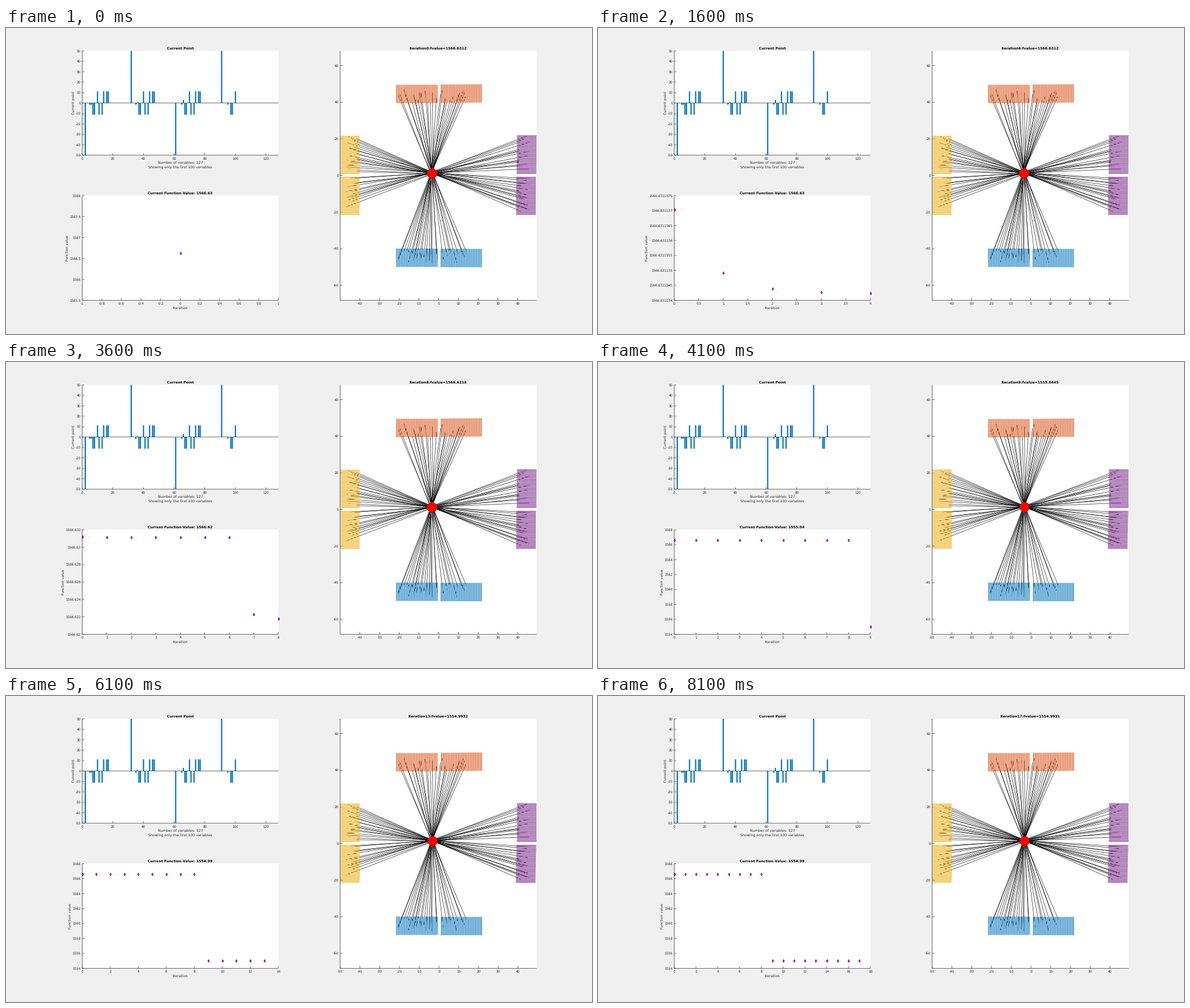
Animation, 1034 px wide and 541 px high, one loop 9100 ms. Source, as a matplotlib script:

```python
import numpy as np
import matplotlib.pyplot as plt
from matplotlib.animation import FuncAnimation
from matplotlib.collections import LineCollection
from matplotlib.patches import Rectangle

W, H = 1034, 541
PX = 0.72  # points per pixel at 100 dpi
INK = "#262626"
BLUE, ORANGE, YELLOW, PURPLE = "#0072BD", "#D95319", "#EDB120", "#7E2F8E"
TICK_SIZE, LABEL_SIZE = 5.68, 6.25
LAST, DROP = 17, 9  # last iteration, and the one with the large drop

plt.rcParams.update({"font.family": "DejaVu Sans", "text.hinting": "none",
                     "path.snap": False, "toolbar": "None"})
fig = plt.figure(figsize=(W / 100, H / 100), dpi=100, facecolor="#f0f0f0")
ax = fig.add_axes([0, 0, 1, 1])
ax.set_xlim(0, W)
ax.set_ylim(H, 0)
ax.axis("off")


def label(x, y, text, size=LABEL_SIZE, color=INK, ha="center", va="baseline", **kw):
    return ax.text(x, y, text, fontsize=size * PX, color=color, ha=ha, va=va, **kw)


def title(x, y, text):
    return label(x, y, text, color="black", weight="bold")


def tick_text(v):
    return f"{round(float(v), 8) + 0.0:.11g}"


def text_width(text):
    return TICK_SIZE * sum({".": 0.318, "-": 0.361}.get(c, 0.636) for c in text)


def nice_ticks(data):
    """Ticks at 1-2-5 steps, ten intervals at most, preferring an exact fit."""
    lo, hi = min(data), max(data)
    if lo == hi:
        lo, hi = lo - 1, hi + 1
    fits = []
    for step in (m * 10.0 ** k for k in range(-8, 2) for m in (1, 2, 5)):
        a, b = np.floor(lo / step + 1e-6), np.ceil(hi / step - 1e-6)
        if b - a <= 10:
            fits.append((b - a - (hi - lo) / step > 1e-3, step, a, b))
    _, step, a, b = min(fits)
    return step * np.arange(a, b + 1)


class Panel:
    """A plot area given in stage pixels."""

    def __init__(self, x0, y0, x1, y1, tick_len):
        self.x0, self.y0, self.x1, self.y1 = x0, y0, x1, y1
        self.tick_len = tick_len
        self.mid = (x0 + x1) / 2
        self.back = ax.add_patch(Rectangle((x0, y0), x1 - x0, y1 - y0,
                                           fc="white", lw=0, zorder=0))
        self.lines([[(x0, y0), (x0, y1)], [(x0, y1), (x1, y1)]])

    def lines(self, segments):
        return ax.add_collection(LineCollection(
            segments, colors=INK, linewidths=0.7 * PX, zorder=1))

    def px(self, x):
        lo, hi = self.xlim
        return self.x0 + (np.asarray(x) - lo) / (hi - lo) * (self.x1 - self.x0)

    def py(self, y):
        lo, hi = self.ylim
        return self.y1 - (np.asarray(y) - lo) / (hi - lo) * (self.y1 - self.y0)

    def x_ticks(self, values):
        xs = self.px(values)
        marks = self.lines([[(x, self.y1), (x, self.y1 - self.tick_len)] for x in xs])
        return [marks] + [label(x, self.y1 + 7.6, tick_text(v), TICK_SIZE)
                          for x, v in zip(xs, values)]

    def y_ticks(self, values, name=""):
        ys = self.py(values)
        texts = [tick_text(v) for v in values]
        marks = self.lines([[(self.x0, y), (self.x0 + self.tick_len, y)] for y in ys])
        out = [marks] + [label(self.x0 - 2.6, y + 2.1, t, TICK_SIZE, ha="right")
                         for y, t in zip(ys, texts)]
        if name:
            x = self.x0 - 6.6 - max(map(text_width, texts))
            out.append(label(x, (self.y0 + self.y1) / 2, name, va="center", rotation=90))
        return out


# --- bar chart of the current point ---
bars = Panel(134.5, 40.5, 480.5, 224.9, 3.5)
bars.xlim, bars.ylim = (0, 128), (-50, 50)
bars.x_ticks(np.arange(0, 121, 20))
bars.y_ticks(np.arange(-50, 51, 10), "Current point")
title(bars.mid, 38.1, "Current Point")
label(bars.mid, 240.2, "Number of variables: 127")
label(bars.mid, 247.6, "Showing only the first 100 variables")
zero = float(bars.py(0))


def bar(k, v):
    if k <= 100:
        left, right = bars.px([k - 0.4, k + 0.4])
        ax.add_patch(Rectangle((left, zero), right - left, float(bars.py(v)) - zero,
                               fc=BLUE, lw=0, zorder=2))


for g in range(4):
    first = 30 * g
    bar(first + 2 - (g > 1), 50 if g % 2 else -50)
    bar(first + 5, -1.6)
    if g < 3:
        bar(first + 6, 2.3 * g - 1.6)
    for k in range(7, 18):
        if k % 3:
            bar(first + k, 11.2 if k in (10, 14, 16, 17) else -11.2)
ax.plot([bars.x0, bars.x1], [zero, zero], color=INK, lw=0.7 * PX, zorder=3)

# --- function value chart ---
chart = Panel(134.5, 296.5, 480.5, 481.5, 3.5)
label(chart.mid, 496.8, "Iteration")
steps = np.arange(LAST + 1)
values = np.where(steps < DROP,
                  1566.63115423 + 2.81e-6 * np.exp(-1.42 * steps),
                  1554.9931 + 0.0514 * np.exp(-0.4 * (steps - DROP) ** 2))
values[6:9] = 1566.631133, 1566.6223, 1566.6218
diamonds, = ax.plot([], [], "d", ms=3.8 * PX, mfc="magenta", mec="black",
                    mew=0.5 * PX, zorder=4)

# --- line map ---
plan = Panel(589.5, 40.5, 936, 481.5, 4.4)
plan.ylim = -68.2, 68
plan.y_ticks(np.arange(-60, 61, 20))


def fan(start, end, n, rng):
    """Unevenly spaced crossings from start to end."""
    at = np.linspace(start, end, n)
    gap = at[1] - at[0]
    at[1:-1] += rng.uniform(-0.8, 0.8, n - 2) * gap
    return at


def ray_edges(rng):
    """Points where the rays enter the inner edges of the blocks."""
    points = []
    for y, *spans in ((133, (698, 759, 15), (765, 806, 13)),
                      (390, (699, 760, 19), (769, 810, 9))):
        points += [(x, y) for span in spans for x in fan(*span, rng)]
    for x, *spans in ((624, (198, 254, 19), (264, 307, 13)),
                      (901, (198, 250, 15), (265, 321, 18))):
        points += [(x, y) for span in spans for y in fan(*span, rng)]
    return np.array(points)


def hatch(color, a, b, c, d, n=30):
    """n strokes; the first runs a-b, the last c-d."""
    t = np.linspace(0, 1, n)[:, None]
    a, b, c, d = map(np.array, (a, b, c, d))
    return LineCollection(np.stack([a + (c - a) * t, b + (d - b) * t], axis=1),
                          colors=color, linewidths=1.28 * PX, zorder=3)


def columns(color, x0, x1, top0, top1):
    return hatch(color, (x0, top0), (x0, top0 + 32.5), (x1, top1), (x1, top1 + 32.5))


def rows(color, y0, y1, left0, left1):
    return hatch(color, (left0, y0), (left0 + 34.7, y0), (left1, y1), (left1 + 34.7, y1))


def build_scene(late):
    rng = np.random.default_rng(8)
    s = 0.5 * late
    centre = np.array([751.5 + 1.6 * s, 256.4 - s])
    edges = ray_edges(rng)
    n = len(edges)
    reach = edges - centre
    depth = rng.uniform(3, 26, n) / np.hypot(*reach.T)
    ends = edges + reach * depth[:, None]
    r = (2.2 if late else 2.6) * np.sqrt(rng.random(n))
    angle = rng.uniform(0, 2 * np.pi, n)
    starts = centre + np.column_stack([r * np.cos(angle), r * np.sin(angle)])

    parts = [
        LineCollection(np.stack([starts, ends], axis=1), colors="black",
                       linewidths=0.6 * PX, zorder=2),
        columns(ORANGE, 689.4, 760.6, 100.4 + s, 100.2 + s),
        columns(ORANGE, 768 + s, 838.6 + s, 99.9 + s, 99.3 + s),
        columns(BLUE, 689.4, 760.8, 389.9, 390),
        columns(BLUE, 767.8 + s, 838.6 + s, 390.4, 390.5),
        rows(YELLOW, 191.5 - s, 257.3, 589.4, 589.4 + s),
        rows(YELLOW, 264, 329.6 - s, 589.4 + s, 589.2 + s),
        rows(PURPLE, 190.7, 257, 901.7, 901 + s),
        rows(PURPLE, 264, 329.3, 900.4 + s, 900.1 - s),
    ]
    for part in parts:
        ax.add_collection(part)
        part.set_clip_path(plan.back)
    parts.append(ax.scatter(*starts.T, s=(12.4 * PX) ** 2, c="red", lw=0, zorder=4))
    plan.xlim = (-50, 49.31) if late else (-49.96, 49.53)
    return parts + plan.x_ticks(np.arange(-50 if late else -40, 41, 10))


scenes = [build_scene(0), build_scene(1)]
live = []


def update(n):
    it = min(LAST, (n + 4) // 5)
    while live:
        live.pop().remove()
    xs, ys = steps[:it + 1], values[:it + 1]
    x_marks, y_marks = nice_ticks(xs), nice_ticks(ys)
    chart.xlim, chart.ylim = x_marks[[0, -1]], y_marks[[0, -1]]
    live.extend(chart.x_ticks(x_marks))
    live.extend(chart.y_ticks(y_marks, "Function value"))
    live.append(title(chart.mid, 294.2, f"Current Function Value: {values[it]:.6g}"))
    live.append(title(plan.mid, 38.1, f"Iteration{it}:fvalue={values[it]:.4f}"))
    diamonds.set_data(chart.px(xs), chart.py(ys))
    for late, scene in enumerate(scenes):
        for part in scene:
            part.set_visible(late == (it >= DROP))
    return []


anim = FuncAnimation(fig, update, frames=91, interval=100, repeat=True,
                     init_func=lambda: update(0), blit=False)
plt.show()
```
